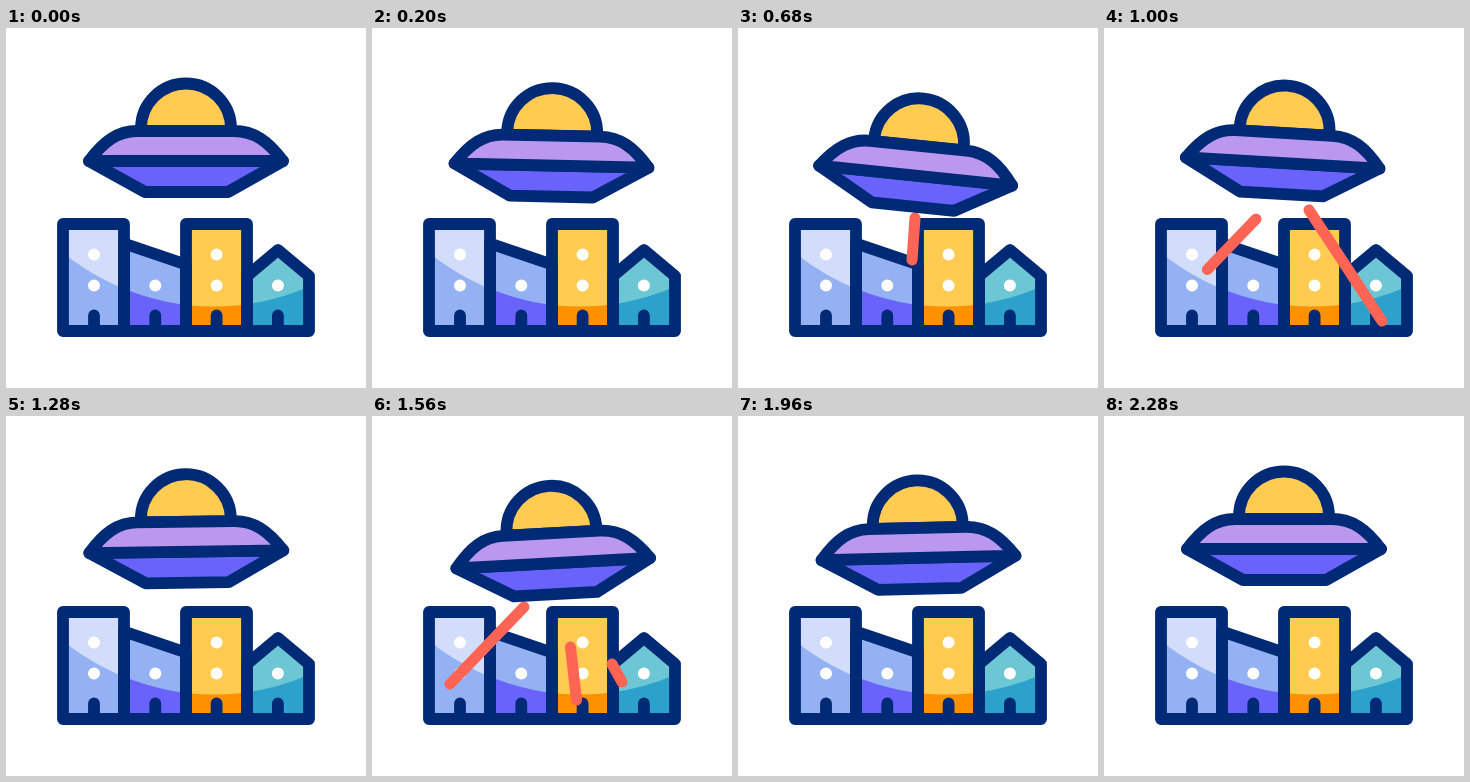
An HTML page that plays this animation: 360 px wide and 360 px high, repeating every 2.4 s.

```html
<!DOCTYPE html>
<html lang="en">
<head>
<meta charset="utf-8">
<title>Saucer over the city</title>
<style>
  html, body { margin: 0; height: 100%; overflow: hidden; background: #fff; }
  svg { display: block; width: 100vw; height: 100vh; }
  .ink { stroke: #012a76; stroke-width: 11.8; stroke-linejoin: round; stroke-linecap: round; }
  #beams { stroke: #ff6454; stroke-width: 11; stroke-linecap: round; }
</style>
</head>
<body>
<svg viewBox="0 0 360 360">
  <defs>
    <clipPath id="glow"><circle cx="208" cy="40" r="238.500"/></clipPath>
    <path id="tower1" d="M57 196H118V303H57Z"/>
    <path id="slope" d="M118 215.500L180 236.500V303H118Z"/>
    <path id="tower2" d="M180 196H241V303H180Z"/>
    <path id="house" d="M241 248L272 222L303 248V303H241Z"/>
  </defs>
  <g>
    <use href="#tower1" fill="#94b1f3"/>
    <use href="#slope" fill="#6963fb"/>
    <use href="#tower2" fill="#ff9100"/>
    <use href="#house" fill="#2ba1cc"/>
  </g>
  <g clip-path="url(#glow)">
    <use href="#tower1" fill="#d2ddfb"/>
    <use href="#slope" fill="#94b1f3"/>
    <use href="#tower2" fill="#ffcb51"/>
    <use href="#house" fill="#6cc6d3"/>
  </g>
  <g class="ink" fill="none">
    <use href="#slope"/>
    <use href="#house"/>
    <use href="#tower1"/>
    <use href="#tower2"/>
    <path d="M88 287.500v15m61.300-15v15m61.300-15v15m61.300-15v15"/>
  </g>
  <path d="M88 226.500h0m0 31h0m61.300 0h0m61.300 0h0m0-31h0m61.300 31h0"
        stroke="#fff" stroke-width="12" stroke-linecap="round"/>
  <g id="beams"></g>
  <g id="saucer" class="ink">
    <path d="M135 103V100.500A45 45 0 0 1 225 100.500V103Z" fill="#ffcb51"/>
    <path d="M83 133L139 164H222L277 133Z" fill="#6963fb"/>
    <path d="M83 133C98 113 112 103 131 103H228C248 103 262 113 277 133Z" fill="#bb98ef"/>
  </g>
</svg>
<script>
const LOOP = 2400, FLIGHT = 2260;
const GROW = 160, HOLD = 60;
const saucer = document.getElementById('saucer');
const beamLayer = document.getElementById('beams');
const beams = [];

const clamp = v => Math.min(1, Math.max(0, v));
const mix = (a, b, p) => a + (b - a) * p;
const ease = p => (1 - Math.cos(Math.PI * clamp(p))) / 2;
const swing = (t, from, to) => ease((t - from) / (to - from));

function shoot(start, [x1, y1], [x2, y2]) {
  const line = document.createElementNS('http://www.w3.org/2000/svg', 'line');
  beamLayer.append(line);
  beams.push({ start, x1, y1, x2, y2, line });
}

const leftGun = [152, 191], midGun = [177, 190], rightGun = [205, 182];

// Two salvos of three, the second aimed further out
for (const i of [0, 1]) {
  const start = 240 + 1120 * i;
  shoot(start, leftGun, [109 - 31 * i, 291 - 23 * i]);
  shoot(start + 30, [198.5, 231], [204.5, 284]);
  shoot(start, [236 + 4 * i, 257 - 9 * i], [244 + 6 * i, 277 - 11 * i]);
}
shoot(500, midGun, [174, 232]);
shoot(840, rightGun, [278, 293]);
shoot(896, leftGun, [78, 268]);

function drawBeam({ start, x1, y1, x2, y2, line }, t) {
  const head = clamp((t - start) / GROW);
  const tail = clamp((t - start - GROW - HOLD) / GROW);
  line.style.display = head > tail ? '' : 'none';
  const ends = { x1: mix(x1, x2, tail), y1: mix(y1, y2, tail), x2: mix(x1, x2, head), y2: mix(y1, y2, head) };
  for (const key in ends) line.setAttribute(key, ends[key]);
}

function draw() {
  const t = performance.now() % LOOP;
  // Two dips per flight; tips right, then left, then levels out
  const drop = 16.4 * Math.sin(2 * Math.PI * Math.min(t, FLIGHT) / FLIGHT) ** 2;
  const tilt = 5.9 * swing(t, 0, 660) - 9 * swing(t, 660, 1600) + 3.1 * swing(t, 1600, FLIGHT);
  saucer.setAttribute('transform', `translate(0 ${drop}) rotate(${tilt} 180 110)`);
  for (const beam of beams) drawBeam(beam, t);
  requestAnimationFrame(draw);
}
draw();
</script>
</body>
</html>
```
